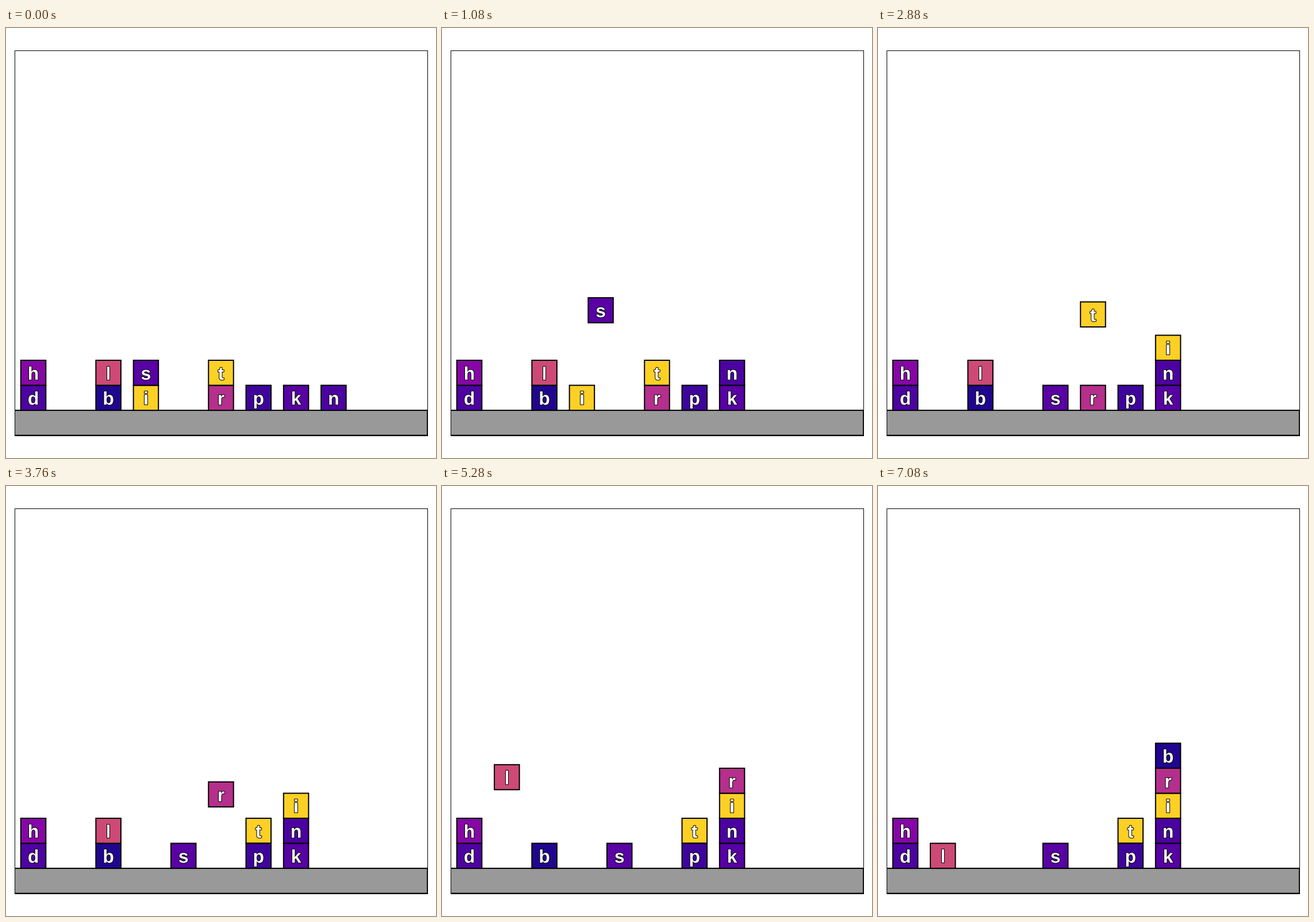
Write a matplotlib script that moves like this. It is 748x748 px and loops after 7.12 s.

```python
import matplotlib.pyplot as plt
from matplotlib.animation import FuncAnimation
from matplotlib.patches import Rectangle
from matplotlib.patheffects import withStroke

SIZE, DPI = 748, 100
PX = 72 / DPI                      # one pixel in points
LEFT, RIGHT, TOP, BOTTOM = 14.9, 733.1, 39.4, 708.6
COLS, PITCH = 11, 1.5              # columns and their spacing in block widths
UNIT = (RIGHT - LEFT) / (COLS * PITCH)
SPEED = 0.4                        # block widths per frame
CLEARANCE = 1.5                    # carry height above the tallest stack

COLORS = {
    "h": "#8606a6", "d": "#4e02a2", "l": "#cd4a76", "b": "#20068f",
    "s": "#5901a5", "i": "#fdd025", "t": "#fdd025", "r": "#b52f8c",
    "p": "#3f049c", "k": "#5801a4", "n": "#4c02a1",
}
START = {0: "dh", 2: "bl", 3: "is", 5: "rt", 6: "p", 7: "k", 8: "n"}
MOVES = [("n", 7), ("s", 4), ("i", 7), ("t", 6), ("r", 7), ("l", 1), ("b", 7)]


def column_x(col):
    return 0.25 + PITCH * col


def glide(a, b):
    """Positions after a along a straight line at constant speed."""
    dist = abs(b[0] - a[0]) + abs(b[1] - a[1])
    steps = max(1, round(dist / SPEED))
    for k in range(1, steps + 1):
        f = k / steps
        yield a[0] + (b[0] - a[0]) * f, a[1] + (b[1] - a[1]) * f


def build_timeline():
    stacks = {c: list(START.get(c, "")) for c in range(COLS)}
    pos = {name: (column_x(c), float(level))
           for c, stack in stacks.items() for level, name in enumerate(stack)}
    timeline = [dict(pos)]
    for name, target in MOVES:
        source = next(s for s in stacks.values() if name in s)
        source.remove(name)
        carry = max(map(len, stacks.values())) + CLEARANCE
        x0, x1 = pos[name][0], column_x(target)
        for stop in [(x0, carry), (x1, carry), (x1, len(stacks[target]))]:
            for point in glide(pos[name], stop):
                pos[name] = point
                timeline.append(dict(pos))
        stacks[target].append(name)
    return timeline


def box(x, y, w, color, z):
    patch = Rectangle((x, y), w, 1, facecolor=color, edgecolor="black",
                      linewidth=2 * PX, joinstyle="miter", snap=False, zorder=z)
    return ax.add_patch(patch)


fig = plt.figure(figsize=(SIZE / DPI, SIZE / DPI), dpi=DPI, facecolor="white")
ax = fig.add_axes([LEFT / SIZE, 1 - BOTTOM / SIZE,
                   (RIGHT - LEFT) / SIZE, (BOTTOM - TOP) / SIZE])
ax.set(xlim=(0, COLS * PITCH), ylim=(-1, (BOTTOM - TOP) / UNIT - 1),
       xticks=[], yticks=[])
for spine in ax.spines.values():
    spine.set_linewidth(PX)

box(0, -1, COLS * PITCH, "#999999", 1)

timeline = build_timeline()
blocks = {}
for name, (x, y) in timeline[0].items():
    label = ax.text(x, y, name, color="white", family="Liberation Sans",
                    weight="bold", size=32 * PX, ha="center", va="baseline",
                    zorder=3,
                    path_effects=[withStroke(linewidth=2 * PX,
                                             foreground="black")])
    blocks[name] = box(x, y, 1, COLORS[name], 2), label


def update(frame):
    for name, (x, y) in timeline[frame].items():
        patch, label = blocks[name]
        patch.set_xy((x, y))
        label.set_position((x + 0.5, y + 0.5 - 12 / UNIT))
    return [artist for pair in blocks.values() for artist in pair]


anim = FuncAnimation(fig, update, frames=len(timeline), interval=40,
                     repeat=True, repeat_delay=0)
plt.show()
```
